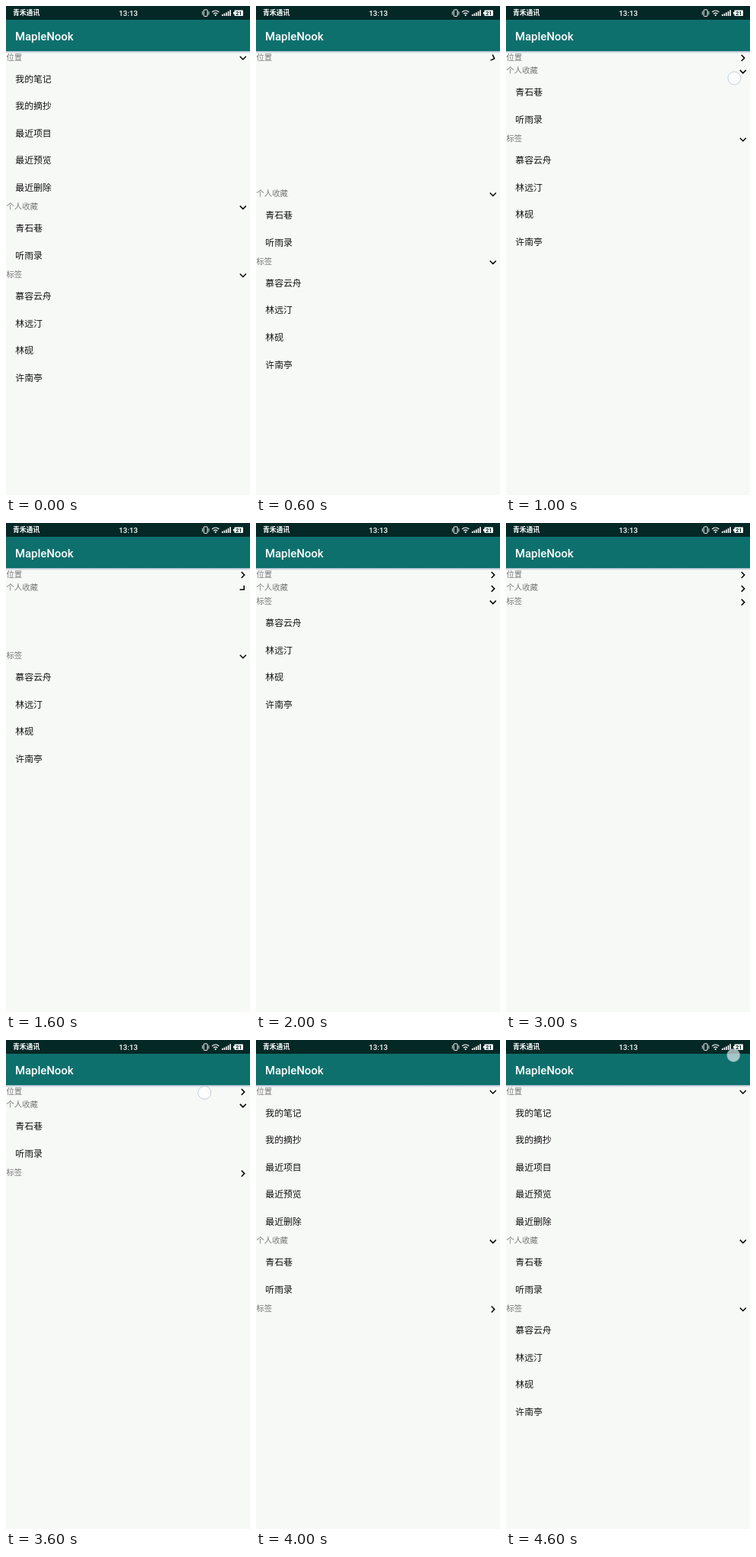
Write an HTML page that moves like this. It is 320x640 px and loops after 4.8 s.

```html
<!DOCTYPE html>
<html lang="zh-CN">
<head>
<meta charset="utf-8">
<title>MapleNook</title>
<style>
  html, body { margin: 0; height: 100%; overflow: hidden; background: #f7f9f7; }
  svg { display: block; width: 320px; height: 640px; }
  text { font-family: Roboto, "Noto Sans CJK SC", "Noto Sans CJK", sans-serif; }
  .head { font-size: 10.37px; fill: #777; }
  .item { font-size: 11.85px; fill: #111; }
</style>
</head>
<body>
<svg id="stage" viewBox="0 0 320 640">
  <defs>
    <linearGradient id="shade" x2="0" y2="1">
      <stop stop-color="#8fa3bd" stop-opacity=".75"/>
      <stop offset="1" stop-color="#8fa3bd" stop-opacity="0"/>
    </linearGradient>
  </defs>
  <rect width="320" height="640" fill="#f7f9f7"/>
  <g id="list"></g>
  <rect y="59" width="320" height="3" fill="url(#shade)"/>
  <rect y="17" width="320" height="42" fill="#0e706d"/>
  <rect width="320" height="18" fill="#042826"/>
  <text x="12" y="44.6" font-size="14.9" font-weight="500" fill="#fff">MapleNook</text>
  <g fill="#fff">
    <text x="9" y="12.4" font-size="8.8" font-weight="700">青禾通讯</text>
    <text x="148" y="12.6" font-size="9.8" font-weight="500">13:13</text>
    <path d="M283 11h1.6v2h-1.6zM285.6 9.8h1.6v3.2h-1.6zM288.2 8.5h1.6v4.5h-1.6zM290.8 7h1.6v6h-1.6zM293.4 5.3h1.6v7.7h-1.6z"/>
    <path d="M298 8h1.5v-1.8q0-.7.7-.7h10.1q.7 0 .7.7v6.1q0 .7-.7.7h-10.1q-.7 0-.7-.7v-1.8h-1.5z"/>
    <circle cx="274.8" cy="12" r="1.1"/>
  </g>
  <g fill="none" stroke="#fff">
    <rect x="259.4" y="4.9" width="4.8" height="8.5" rx=".8"/>
    <path d="M257.5 7v4.5M266 7v4.5" stroke-width=".8"/>
    <path d="M270.2 8q4.6-4 9.2 0M272.2 10.2q2.6-2.2 5.2 0" stroke-width="1.2"/>
  </g>
  <text x="305.3" y="11.9" font-size="7.2" font-weight="700" text-anchor="middle" fill="#042826">21</text>
  <circle id="touch" r="8.5" fill="#fff" fill-opacity=".62" stroke="#8ea6c4" stroke-opacity=".6" stroke-width=".9"/>
</svg>
<script>
const LOOP = 4800, STEP = 200, TOP = 59, HEAD = 17.78, ROW = 35.55;
const CHEVRON = "M-4.59-3.41L0 1.17 4.59-3.41 6-2 0 4-6-2z";

// Poses: [start ms, open share of the height, item opacity, chevron angle]
const open = [0, 1, 1, 0];
const sections = [
  { title: "位置", items: ["我的笔记", "我的摘抄", "最近项目", "最近预览", "最近删除"],
    poses: [open, [600, .904, 0, -70], [800, 0, 0, -90], [3800, 1, .8, 0], [4000, 1, 1, 0]] },
  { title: "个人收藏", items: ["青石巷", "听雨录"],
    poses: [open, [1600, 1, 0, -45], [1800, 0, 0, -90], [3200, .985, .8, -5], [3400, 1, 1, 0]] },
  { title: "标签", items: ["慕容云舟", "林远汀", "林砚", "许南亭"],
    poses: [open, [2800, 0, 0, -90], [4400, 1, 1, -6], [4600, 1, 1, 0]] }
];
// Taps: [start ms, x, y], each visible for one step
const taps = [[1000, 299.5, 94.5], [2600, 253, 112], [3600, 260.3, 69], [4200, 303, 353], [4600, 298.3, 20]];

const list = document.getElementById("list");
const touch = document.getElementById("touch");

function add(parent, tag, attrs, text = "") {
  const node = document.createElementNS("http://www.w3.org/2000/svg", tag);
  for (const key in attrs) node.setAttribute(key, attrs[key]);
  node.textContent = text;
  return parent.appendChild(node);
}

for (const s of sections) {
  s.group = add(list, "g", {});
  add(s.group, "text", { class: "head", x: .5, y: 11.5 }, s.title);
  s.chevron = add(s.group, "path", { d: CHEVRON });
  s.body = add(s.group, "g", {});
  s.items.forEach((name, i) =>
    add(s.body, "text", { class: "item", x: 12.3, y: HEAD + ROW * (i + .5) + 5 }, name));
}

function draw(now) {
  const t = Math.floor(now % LOOP / STEP) * STEP;
  let y = TOP;
  for (const s of sections) {
    const [, share, alpha, angle] = s.poses.findLast(p => p[0] <= t);
    s.group.setAttribute("transform", `translate(0 ${y})`);
    s.chevron.setAttribute("transform", `translate(310.8 9.1) rotate(${angle}) scale(.75)`);
    s.body.setAttribute("opacity", alpha);
    y += HEAD + share * ROW * s.items.length;
  }
  const tap = taps.find(p => p[0] === t);
  touch.setAttribute("visibility", tap ? "visible" : "hidden");
  if (tap) touch.setAttribute("transform", `translate(${tap[1]} ${tap[2]})`);
}

const start = performance.now();
function tick() {
  draw(performance.now() - start);
  requestAnimationFrame(tick);
}
tick();
</script>
</body>
</html>
```
